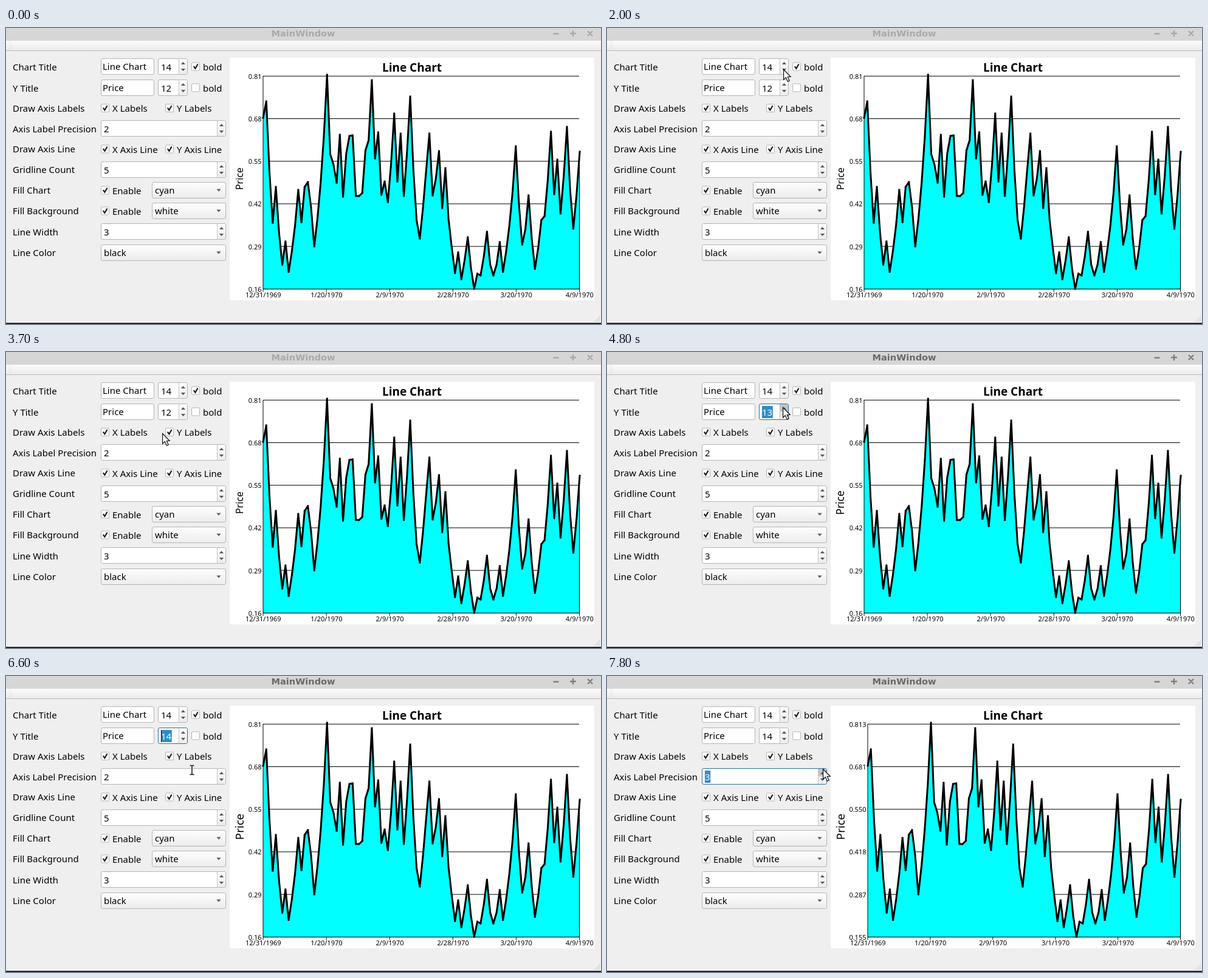
An HTML page that plays this animation: 979 by 488 pixels, repeating every 8000 ms.

```html
<!DOCTYPE html>
<html lang="en">
<head>
<meta charset="utf-8">
<title>Chart settings</title>
<style>
html, body { margin: 0; width: 100%; height: 100%; overflow: hidden; background: #efefef; }
svg { display: block; }
text { font: 15px "Noto Sans", "Open Sans", sans-serif; fill: #000; white-space: pre; }
.caption { font: bold 14.6px "DejaVu Sans", "Noto Sans", sans-serif; fill: #a9a9a9; text-anchor: middle; }
.buttons { stroke: #a9a9a9; stroke-width: 2.4; fill: none; }
.active .caption { fill: #696969; }
.active .buttons { stroke: #7d7d7d; }
.heading { font-size: 19px; font-weight: bold; text-anchor: middle; }
.small text { font-size: 11px; }
.mid { text-anchor: middle; }
.end { text-anchor: end; }
.box { fill: #fff; stroke: #b4b4b4; }
.combo { fill: url(#button); stroke: #b4b4b4; }
.step { fill: url(#button); }
.arrow { fill: #5a5a5a; }
.tick { fill: none; stroke: #111; stroke-width: 2; }
.mark { fill: #308cc6; visibility: hidden; }
.caret { fill: #000; visibility: hidden; }
.down { fill: #c4c4c4; visibility: hidden; }
.focus .box { stroke: #2a6f9f; }
.focus .mark, .focus.blink .caret, .pressed .down { visibility: visible; }
.focus text { fill: #fff; }
</style>
</head>
<body>
<svg id="stage" width="979" height="488" viewBox="0 0 979 488">
  <defs>
    <linearGradient id="button" x2="0" y2="1"><stop stop-color="#fefefe"/><stop offset="1" stop-color="#ececec"/></linearGradient>
    <linearGradient id="bar" x2="0" y2="1"><stop stop-color="#fcfcfc"/><stop offset="1" stop-color="#ebebeb"/></linearGradient>
  </defs>
  <rect width="979" height="488" fill="#efefef"/>
  <rect width="979" height="21" fill="#d6d6d6"/>
  <text class="caption" x="489" y="14">MainWindow</text>
  <path class="buttons" d="M900.5 9.5h9M928 9h10M933 4v10M957 5l8 8M965 5l-8 8"/>
  <rect y="21" width="979" height="16" fill="url(#bar)"/>
  <rect y="37" width="979" height="1" fill="#b2b2b2"/>
  <rect y="38" width="979" height="1" fill="#f8f8f8"/>
  <g id="dots" fill="#bcbcbc"></g>
  <rect y="486" width="979" height="2" fill="#202226"/>
  <g id="form"></g>
  <rect x="368" y="49" width="600" height="400" fill="#fff"/>
  <text class="heading" x="668" y="72">Line Chart</text>
  <text class="mid" id="yTitle">Price</text>
  <g id="plot" class="small"></g>
  <g id="cursor">
    <path id="pointer" d="M.6 .6V17.2L4.4 13.6 7.3 20.2 10.2 18.9 7.4 12.5H12.2Z" fill="#fff" stroke="#111" stroke-width="1.2"/>
    <g id="beam" fill="none">
      <path d="M-3.5 -7.5H3.5M-3.5 7.5H3.5M0 -7.5V7.5" stroke="#fff" stroke-width="3"/>
      <path d="M-3.5 -7.5H-1L0 -6.5 1 -7.5H3.5M-3.5 7.5H-1L0 6.5 1 7.5H3.5M0 -6.5V6.5" stroke="#111" stroke-width="1.5"/>
    </g>
  </g>
</svg>
<script>
const $ = id => document.getElementById(id);
const rect = (cls, x, y, w, h, r = 0) =>
  `<rect class="${cls}" x="${x}" y="${y}" width="${w}" height="${h}" rx="${r}"/>`;
const text = (x, y, s, cls = "") => `<text class="${cls}" x="${x}" y="${y}">${s}</text>`;
const line = (x1, y1, x2, y2) => `<path d="M${x1} ${y1}L${x2} ${y2}" stroke="#000"/>`;
const tri = (x, y, h) => `<path class="arrow" d="M${x - 3.7} ${y - h / 2}h7.4l-3.7 ${h}z"/>`;

// Form widgets
const edit = (x, y, w, s) => rect("box", x + .5, y + .5, w - 1, 26, 2.5) + text(x + 3, y + 19, s);

function check(x, y, on, s) {
  return rect("box", x - 6.5, y - 6.5, 13, 13, 1.5) +
    (on ? `<path class="tick" d="M${x - 3.2} ${y - .3}l2.6 3.6 4.2 -7.4"/>` : "") +
    text(x + 12, y + 6, s);
}

function spin(id, x, y, w, s) {
  const b = x + w - 15;
  const wide = 8.6 * s.length;
  return `<g id="${id}">` + rect("box", x + .5, y + .5, w - 1, 26, 2.5) +
    rect("step", b + 1, y + 1, 13, 25, 2) + rect("down", b + 1, y + 1, 13, 12.5) +
    `<path d="M${b + .5} ${y + 1}v25" stroke="#c3c3c3"/>` +
    tri(b + 7.5, y + 8, -4.2) + tri(b + 7.5, y + 19, 4.2) +
    rect("mark", x + 5, y + 4, wide + .6, 20) + rect("caret", x + 5, y + 4, 1, 20) +
    text(x + 5, y + 20, s) + "</g>";
}

const combo = (x, y, w, s) => rect("combo", x + .5, y + .5, w - 1, 26, 2.5) +
  tri(x + w - 12, y + 13.5, 4.2) + text(x + 5, y + 19, s);

const labels = ["Chart Title", "Y Title", "Draw Axis Labels", "Axis Label Precision", "Draw Axis Line",
  "Gridline Count", "Fill Chart", "Fill Background", "Line Width", "Line Color"];
const bases = [70, 105, 138, 172, 205, 239, 273, 307, 342, 376];

$("form").innerHTML = labels.map((s, i) => text(11, bases[i], s)).join("") +
  edit(156, 50, 88, "Line Chart") + spin("titleSize", 250, 50, 49, "14") + check(312, 63.5, true, "bold") +
  edit(156, 85, 88, "Price") + spin("ySize", 250, 85, 49, "12") + check(312, 98.5, false, "bold") +
  check(163, 132, true, "X Labels") + check(269, 132, true, "Y Labels") +
  spin("precision", 156, 152, 206, "2") +
  check(163, 199.5, true, "X Axis Line") + check(269, 199.5, true, "Y Axis Line") +
  spin("gridCount", 156, 220, 206, "5") +
  check(163, 267.5, true, "Enable") + combo(240, 254, 122, "cyan") +
  check(163, 301.5, true, "Enable") + combo(240, 288, 122, "white") +
  spin("lineWidth", 156, 322, 206, "3") + combo(156, 357, 206, "black");

let dots = "";
for (let i = 0; i < 7; i++) dots += rect("", i % 2 ? 8 : 5, 22 + 2 * i, 1, 1);
for (let i = 0; i < 5; i++)
  for (let j = 4 - i; j < 5; j++) dots += rect("", 968 + 2 * i, 475 + 2 * j, 1, 1);
$("dots").innerHTML = dots;

// Chart
const values = [148, 121, 238, 321, 262, 338, 390, 352, 402, 368, 325, 267, 320, 262, 254, 296, 360, 314, 255, 178,
  77, 208, 225, 255, 176, 278, 207, 178, 177, 277, 277, 272, 202, 185, 86, 215, 172, 275, 253, 287,
  225, 141, 253, 174, 277, 205, 113, 234, 317, 347, 296, 234, 174, 276, 249, 203, 297, 231, 316, 362,
  404, 370, 414, 383, 345, 396, 430, 405, 408, 377, 336, 390, 408, 390, 353, 402, 368, 326, 271, 195,
  291, 357, 332, 276, 347, 397, 363, 317, 310, 251, 171, 274, 217, 306, 244, 163, 267, 331, 275, 204];

function drawPlot(digits) {
  const left = digits === 2 ? 423 : 429, right = 944, bottom = 430.3;
  const dates = ["12/31/1969", "1/20/1970", "2/9/1970", digits === 2 ? "2/28/1970" : "3/1/1970", "3/20/1970", "4/9/1970"];
  const pts = values.map((v, i) => (left + i * (right - left) / 99).toFixed(2) + " " + v);
  let out = "";
  for (let i = 0; i < 6; i++) {
    const y = 79.3 + 70.2 * i;
    out += line(left, y, 943, y) +
      text(left - 2.5, Math.round(y + 4.5), (.813 - .13156 * i).toFixed(digits), "end");
  }
  out += `<path d="M${left} ${bottom}L${pts.join("L")}V${bottom}Z" fill="#0ff"/>`;
  out += line(left, 79, left, bottom) + line(left, bottom, 943.5, bottom) + line(943.5, 204, 943.5, bottom);
  dates.forEach((s, i) => {
    const x = left + i * (943.5 - left) / 5;
    out += line(x, bottom, x, 435) + text(x + .3, 444, s, "mid");
  });
  const segs = pts.slice(1).map((p, i) => `M${pts[i]}L${p}`).join("");
  $("plot").innerHTML = out + `<path d="${segs}" stroke="#000" stroke-width="3" stroke-linecap="square"/>`;
}

// Pointer path: time, x, y
const path = [[900, 316, 1], [1200, 311, 39], [1400, 312, 45], [1700, 312, 45], [2400, 260, 98], [2800, 260, 98],
  [2900, 239, 112], [3100, 237, 122], [3500, 249, 137], [3600, 249, 137], [3700, 257, 134], [4500, 289, 91],
  [6100, 289, 91], [6600, 306, 155], [7000, 341, 176], [7200, 354, 169], [7500, 355, 153], [8000, 355, 153]];
const fields = [[156, 50, 244, 77], [250, 50, 284, 77], [156, 85, 244, 112], [250, 85, 284, 112], [156, 152, 347, 179]];

function moveCursor(t) {
  $("cursor").style.display = t < 900 ? "none" : "";
  if (t < 900) return;
  const i = path.findIndex(p => p[0] > t);
  const [a, b] = [path[i - 1], path[i]];
  const k = (t - a[0]) / (b[0] - a[0]);
  const x = Math.round(a[1] + (b[1] - a[1]) * k), y = Math.round(a[2] + (b[2] - a[2]) * k);
  const typing = fields.some(f => x >= f[0] && x < f[2] && y >= f[1] && y < f[3]);
  $("cursor").setAttribute("transform", `translate(${x} ${y})`);
  $("pointer").style.display = typing ? "none" : "";
  $("beam").style.display = typing ? "" : "none";
}

function setSpin(id, value, focus, pressed, blink) {
  const g = $(id);
  g.querySelector("text").textContent = value;
  g.classList.toggle("focus", focus);
  g.classList.toggle("pressed", pressed);
  g.classList.toggle("blink", blink);
}

let shownTime = -1, shownDigits = 0;

function render(t) {
  t = Math.floor(t / 100) * 100;
  if (t === shownTime) return;
  shownTime = t;
  const size = t < 4800 ? 12 : t < 5500 ? 13 : 14;
  const digits = t < 7800 ? 2 : 3;
  const blink = t >= 5500 && Math.floor((t - 5500) / 500) % 2 === 0;
  $("stage").classList.toggle("active", t >= 4800);
  setSpin("ySize", size, t >= 4800 && t < 7800, t >= 4800 && t < 6000, blink);
  setSpin("precision", digits, t >= 7800, t >= 7800, false);
  $("yTitle").style.fontSize = size * 4 / 3 + "px";
  $("yTitle").setAttribute("transform", `translate(${389.5 + (size - 12) * .6} 248.5) rotate(-90)`);
  if (digits !== shownDigits) drawPlot(shownDigits = digits);
  moveCursor(t);
}

const start = performance.now();
function loop() {
  render((performance.now() - start) % 8000);
  requestAnimationFrame(loop);
}
loop();
</script>
</body>
</html>
```
